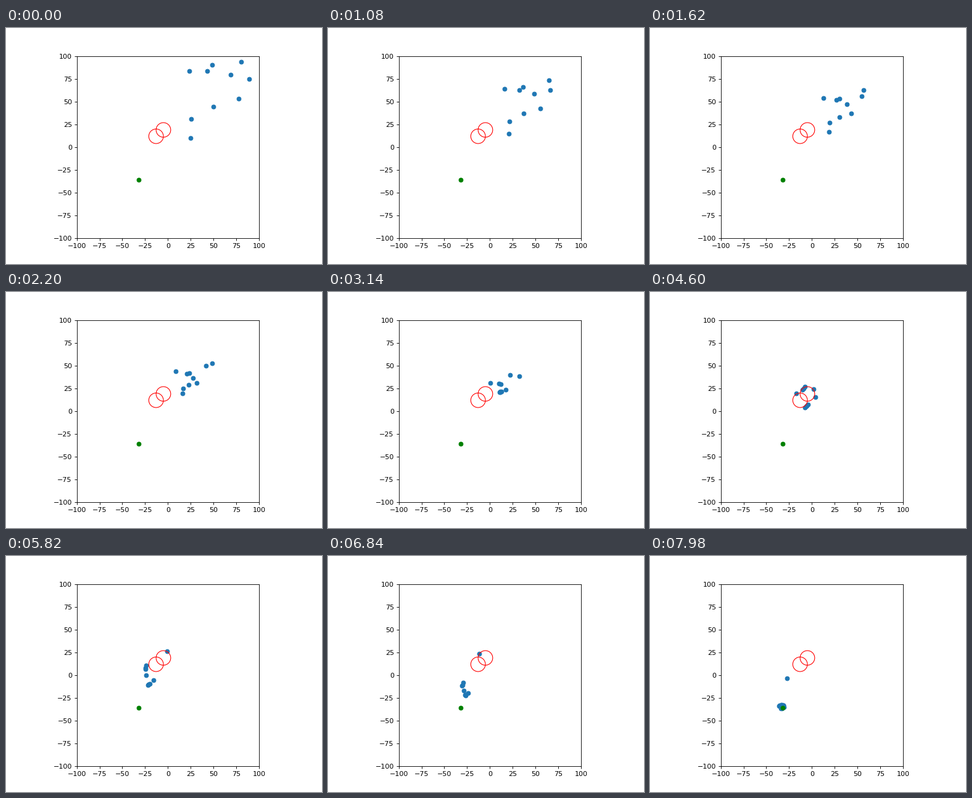
Animation of 512x384 px, one loop 8 s. Source, as a matplotlib script:

```python
import numpy as np
import matplotlib.pyplot as plt
from matplotlib.animation import FuncAnimation

FRAMES = 400
GOAL = (-32, -36)
OBSTACLES = [(-13, 12), (-5, 19)]
RADIUS = 8

# Start, gather before the obstacles, pass them, regroup, settle at the goal
STAGES = [0, 157, 230, 291, 399]
GUIDES = [
    [(23.5, 84), (0.5, 31), (-17, 19.5), (-24, 0)],      # above, head
    [(48.5, 90.5), (12, 30), (-9, 25), (-24.5, 8)],      # above, middle
    [(89.3, 75), (22, 40), (-8, 27), (-24, 11)],         # above, tail
    [(25, 10), (10.5, 21), (-7.5, 4), (-22, -11)],       # below, head
    [(77.7, 53.5), (17, 23.5), (4, 15.5), (-16, -5.5)],  # below, tail
]
# Followers: start, guide ahead, guide behind, rank between the two
FOLLOWERS = [
    ((43, 84), 0, 1, 0.8),
    ((25.5, 31), 3, 4, 0.1),
    ((50, 44.5), 3, 4, 0.15),
    ((69, 80), 3, 4, 0.3),
]
# The straggler gets held up behind the upper obstacle
STRAGGLER = {0: (80.5, 94), 157: (32.5, 38.5), 230: (2, 24.5),
             291: (-1, 26.5), 328: (-8.7, 25.7), 399: (-27, -3.5)}


def smooth(keys, pts):
    """Monotone cubic curve through pts, one position per frame."""
    keys, pts = np.array(keys, float), np.array(pts, float)
    t = np.arange(FRAMES)
    h = np.diff(keys)[:, None]
    d = np.diff(pts, axis=0) / h
    same = d[:-1] * d[1:] > 0
    w1, w2 = 2 * h[1:] + h[:-1], h[1:] + 2 * h[:-1]
    den = np.where(same, w1 * d[1:] + w2 * d[:-1], 1)
    inner = np.where(same, (w1 + w2) * d[:-1] * d[1:] / den, 0)
    m = np.vstack([d[:1], inner, d[-1:]])
    i = np.clip(np.searchsorted(keys, t, side="right") - 1, 0, len(h) - 1)
    u = ((t - keys[i]) / h[i, 0])[:, None]
    return ((1 + 2 * u) * (1 - u) ** 2 * pts[i] + u * (1 - u) ** 2 * h[i] * m[i]
            + u * u * (3 - 2 * u) * pts[i + 1] + u * u * (u - 1) * h[i] * m[i + 1])


def follow(start, ahead, behind, rank):
    a, b = np.array(GUIDES[ahead]), np.array(GUIDES[behind])
    return [start, *(a + rank * (b - a))[1:]]


def settle(route):
    """End on a small ring by the goal, on the side the boid comes from."""
    x, y = route[-1]
    a = np.pi / 2 + (11 - y) / 22 * 1.8 * np.pi if x < -21 else (y + 5) * 0.3
    return (-33.2 + 2.8 * np.cos(a), -34.7 + 2.1 * np.sin(a))


routes = GUIDES + [follow(*f) for f in FOLLOWERS]
tracks = [smooth(STAGES, [*r, settle(r)]) for r in routes]
tracks.append(smooth(list(STRAGGLER), list(STRAGGLER.values())))
tracks = np.stack(tracks, axis=1)

fig, ax = plt.subplots(figsize=(6.4, 4.8), dpi=80)
ax.set(xlim=(-100, 100), ylim=(-100, 100), aspect="equal")
boids = ax.scatter(*tracks[0].T)
ax.scatter(*GOAL, color="green")
for center in OBSTACLES:
    ax.add_patch(plt.Circle(center, RADIUS, color="red", fill=False))


def update(i):
    boids.set_offsets(tracks[i])
    return (boids,)


anim = FuncAnimation(fig, update, frames=FRAMES, interval=20, repeat=True)
plt.show()
```
